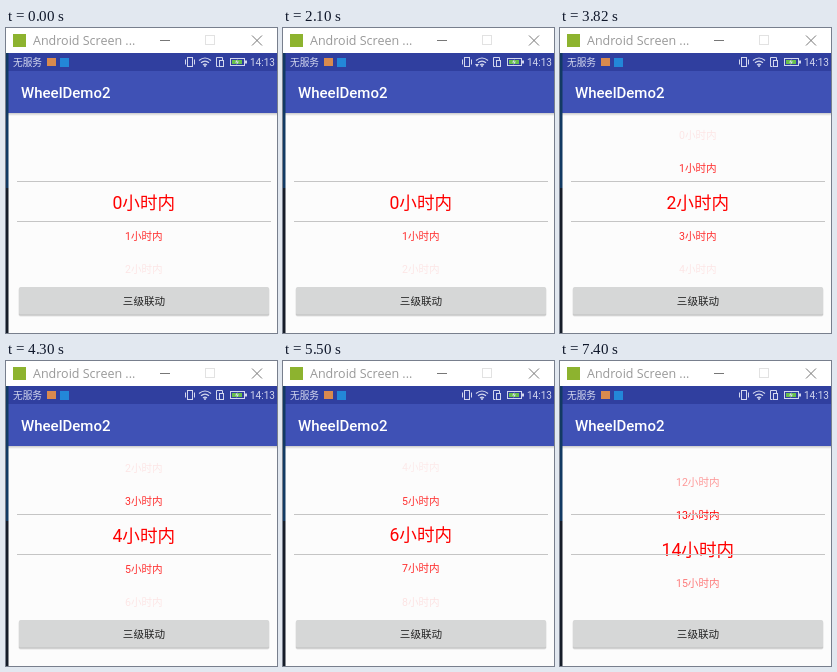
Write an HTML page that moves like this. It is 271 px wide and 305 px high and loops after 8 s.

```html
<!DOCTYPE html>
<html lang="zh">
<head>
<meta charset="utf-8">
<title>WheelDemo2</title>
<style>
  html, body { margin: 0; width: 100%; height: 100%; overflow: hidden; background: #fcfcfc; }
  svg { display: block; width: 271px; height: 305px; }
  text { font-family: Roboto, "Noto Sans CJK SC", "Noto Sans CJK", sans-serif; }
  .title { font: 12.5px "Open Sans", sans-serif; fill: #999; }
  .status { fill: #d3d7ee; }
  .line { fill: none; stroke: #d3d7ee; }
  #wheel text { fill: #f00; text-anchor: middle; }
</style>
</head>
<body>
<svg viewBox="0 0 271 305">
  <defs>
    <linearGradient id="shade" x2="0" y2="1">
      <stop stop-color="#000" stop-opacity=".2"/>
      <stop offset="1" stop-color="#000" stop-opacity="0"/>
    </linearGradient>
  </defs>
  <rect width="271" height="305" fill="#fcfcfc"/>

  <!-- window title bar -->
  <rect width="271" height="25" fill="#fff"/>
  <rect x="7" y="6" width="13" height="13" fill="#8db32f"/>
  <text class="title" x="27" y="17">Android Screen ...</text>
  <path d="M154 12.5h10M246 7.5l10 10m0-10l-10 10" fill="none" stroke="#777"/>
  <rect x="199.5" y="7.5" width="9" height="9" fill="none" stroke="#e2e2e2"/>

  <!-- status bar and app bar -->
  <rect y="25" width="271" height="18" fill="#303f9f"/>
  <rect y="43" width="271" height="42" fill="#3f51b5"/>
  <rect y="85" width="271" height="3" fill="url(#shade)"/>
  <text class="status" x="7" y="37.7" font-size="9.7">无服务</text>
  <rect x="41" y="30" width="9" height="8" fill="#d98a4e"/>
  <rect x="54" y="30" width="9" height="9" fill="#2387d8"/>
  <g class="line">
    <rect x="181.5" y="29.5" width="5" height="9"/>
    <path d="M179.5 31.5v5M188.5 31.5v5"/>
    <path d="M193 32.5q6-5 12 0M195 34.8q4-3.4 8 0M197 37q2-1.6 4 0" stroke-width="1.2"/>
    <path d="M216.5 32v-2.5h-6v9h2"/>
    <rect x="213.500" y="32.500" width="4" height="6"/>
    <rect x="224.500" y="30.500" width="14" height="7"/>
  </g>
  <circle class="status" cx="199" cy="38" r="1"/>
  <path id="arrow" class="status" d="M192 36h4l-2 3z"/>
  <rect x="226" y="32" width="10" height="4" fill="#68c04c"/>
  <path class="status" d="M239 32.500h2v3h-2zM231.500 31l-2.500 3.500h2l-.5 2.500 2.500-3.500h-2z"/>
  <text class="status" x="244" y="37.800" font-size="10">14:13</text>
  <text x="15" y="70" font-size="15" font-weight="500" fill="#fff">WheelDemo2</text>

  <!-- wheel -->
  <g id="wheel"></g>
  <path d="M11 153.500h254M11 193.500h254" stroke="#c5c5c5"/>

  <!-- button -->
  <rect x="12.500" y="260" width="251" height="28.500" rx="2" fill="#000" opacity=".1"/>
  <rect x="13" y="260" width="250" height="27.500" rx="1.500" fill="#000" opacity=".15"/>
  <rect x="13" y="259" width="250" height="27.500" rx="1.500" fill="#d6d7d7"/>
  <text x="138" y="277" font-size="10.600" font-weight="500" text-anchor="middle" fill="#222">三级联动</text>

  <rect y="25" width="2.500" height="135" fill="#123a63"/>
  <rect y="160" width="2.500" height="145" fill="#161d29"/>
</svg>
<script>
const LOOP = 8000, ROW = 33.6, MID = 174;
// start time, selected hour, vertical offset of the wheel
const steps = [
  [0, 0, 0], [3100, 2, 0], [4300, 4, 0],
  [5500, 6, -0.6], [6400, 10, 3], [7400, 14, 14]
];
const wheel = document.getElementById('wheel');
const arrow = document.getElementById('arrow');
let shown;

function row(hour, y, big) {
  if (hour < 0) return '';
  const size = big ? 17.6 : 10.6;
  const alpha = Math.max(0, Math.min(1, 1.55 - 0.0218 * Math.abs(y - MID)));
  return `<text x="137.8" y="${y + size * 0.375}" font-size="${size}" opacity="${alpha}">${hour}小时内</text>`;
}

function draw() {
  const t = performance.now() % LOOP;
  const step = steps.findLast(s => s[0] <= t);
  if (step !== shown) {
    const [, hour, shift] = shown = step;
    wheel.innerHTML = [-2, -1, 0, 1, 2]
      .map(i => row(hour + i, MID + shift + i * ROW, i === 0)).join('');
  }
  arrow.style.opacity = t >= 600 && t < 3100 ? 1 : 0;
  requestAnimationFrame(draw);
}
draw();
</script>
</body>
</html>
```
